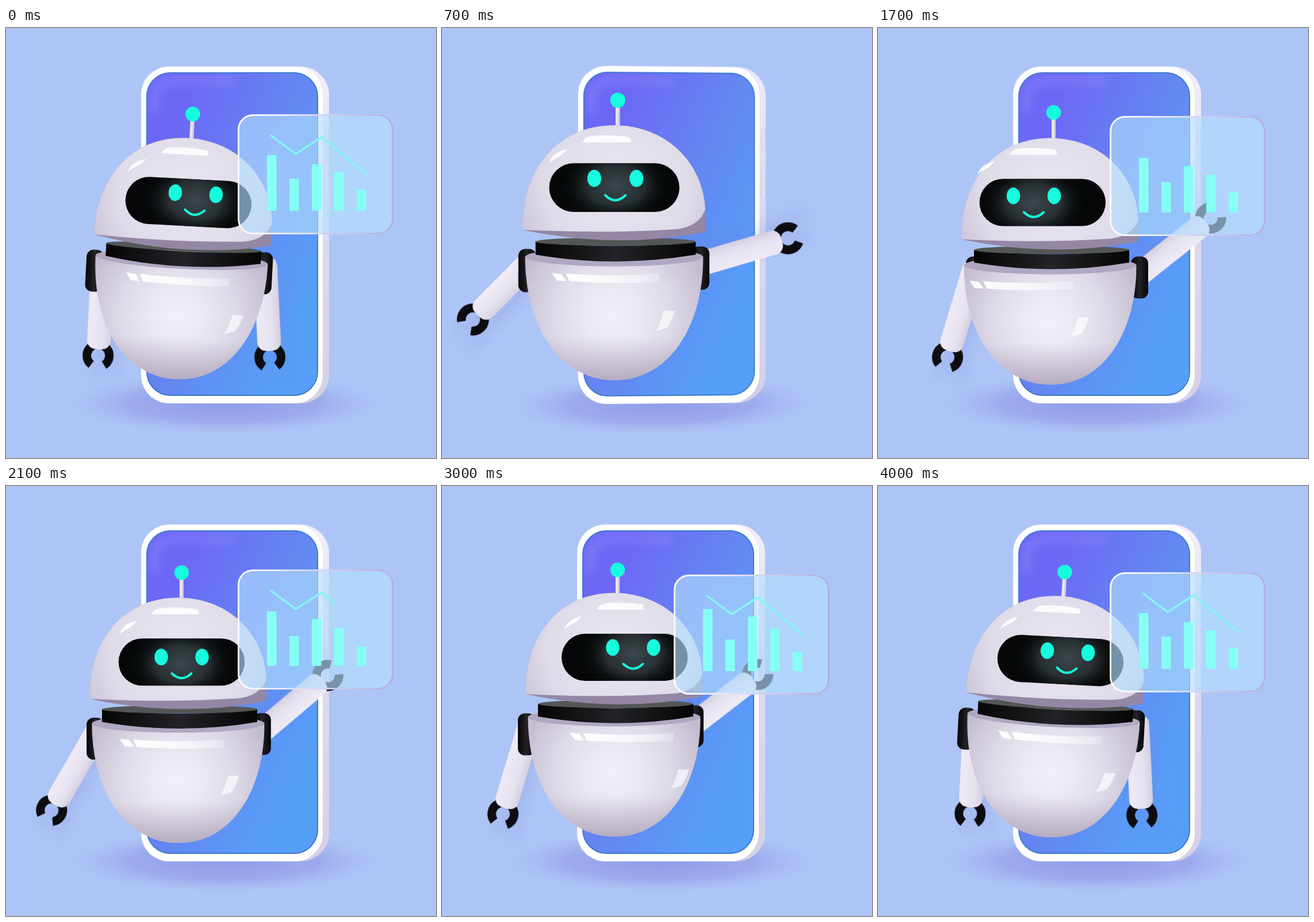
An HTML page for the animation above (4100 ms loop, 748 px wide and 748 px high).

```html
<!DOCTYPE html>
<html lang="en">
<head>
<meta charset="utf-8">
<title>Robot assistant</title>
<style>
  html, body { margin: 0; width: 100%; height: 100%; overflow: hidden; background: #adc5f6; }
  #stage { position: relative; width: 748px; height: 748px; overflow: hidden; }
  #stage > svg { position: absolute; left: 0; top: 0; width: 748px; height: 748px; overflow: visible; }
  #phone { transform-origin: 398px 360px; }
  .arm { filter: drop-shadow(14px 22px 12px rgba(118, 126, 215, .2)); }
</style>
</head>
<body>
<div id="stage">
  <svg viewBox="0 0 748 748">
    <defs>
      <radialGradient id="floorFill">
        <stop offset="0" stop-color="#8f97e8" stop-opacity=".95"/>
        <stop offset=".6" stop-color="#949fe9" stop-opacity=".7"/>
        <stop offset="1" stop-color="#a3b4f1" stop-opacity="0"/>
      </radialGradient>
    </defs>
    <ellipse id="floor" cx="380" cy="653" rx="272" ry="54" fill="url(#floorFill)"/>
  </svg>

  <svg id="phone" viewBox="0 0 748 748">
    <defs>
      <linearGradient id="screenFill" gradientUnits="userSpaceOnUse" x1="244" y1="290" x2="542" y2="420">
        <stop offset="0" stop-color="#6c68f5"/>
        <stop offset=".5" stop-color="#6486f1"/>
        <stop offset="1" stop-color="#569ff9"/>
      </linearGradient>
      <linearGradient id="sideFill" x2="0" y2="1">
        <stop offset="0" stop-color="#f1eff8"/>
        <stop offset=".4" stop-color="#dedcf0"/>
        <stop offset="1" stop-color="#d6d0e4"/>
      </linearGradient>
      <filter id="soft" x="-30%" y="-30%" width="160%" height="160%"><feGaussianBlur stdDeviation="8"/></filter>
    </defs>
    <g id="side">
      <rect x="248" y="67" width="314" height="586" rx="50" fill="url(#sideFill)"/>
      <g fill="#e9e5f3" stroke="#cbc7e2">
        <rect x="555" y="173" width="6" height="37" rx="3"/>
        <rect x="555" y="247" width="6" height="47" rx="3"/>
      </g>
    </g>
    <rect x="235" y="67" width="316" height="586" rx="49" fill="#fff"/>
    <rect x="245" y="78" width="297" height="561" rx="41" fill="url(#screenFill)" stroke="#3c78cc" stroke-width="2"/>
    <path d="M258 150V124Q260 94 294 92H400" fill="none" stroke="#a7a0fb" stroke-width="10" opacity=".4" filter="url(#soft)"/>
  </svg>

  <svg viewBox="0 0 748 748">
    <defs>
      <radialGradient id="headFill" gradientUnits="userSpaceOnUse" cx="305" cy="285" r="175">
        <stop offset="0" stop-color="#e9e6f1"/>
        <stop offset=".7" stop-color="#dfdce9"/>
        <stop offset="1" stop-color="#cdc7da"/>
      </radialGradient>
      <radialGradient id="bodyFill" gradientUnits="userSpaceOnUse" cx="297" cy="500" r="165">
        <stop offset="0" stop-color="#f1eff7"/>
        <stop offset=".3" stop-color="#eae7f1"/>
        <stop offset=".6" stop-color="#dedae7"/>
        <stop offset="1" stop-color="#c4bdd0"/>
      </radialGradient>
      <linearGradient id="bodyShade" x2="0" y2="1">
        <stop offset=".65" stop-color="#a99db5" stop-opacity="0"/>
        <stop offset="1" stop-color="#a395ae" stop-opacity=".65"/>
      </linearGradient>
      <linearGradient id="armFill">
        <stop offset="0" stop-color="#eeebf6"/>
        <stop offset=".6" stop-color="#e6e3f0"/>
        <stop offset="1" stop-color="#d5d0e1"/>
      </linearGradient>
      <linearGradient id="blackFill">
        <stop offset="0" stop-color="#050506"/>
        <stop offset=".5" stop-color="#232327"/>
        <stop offset="1" stop-color="#050506"/>
      </linearGradient>
      <linearGradient id="shine">
        <stop offset="0" stop-color="#fff" stop-opacity=".95"/>
        <stop offset=".45" stop-color="#fff" stop-opacity=".75"/>
        <stop offset="1" stop-color="#fff" stop-opacity=".25"/>
      </linearGradient>
      <radialGradient id="glow">
        <stop offset="0" stop-color="#3d484c"/>
        <stop offset=".5" stop-color="#272f32"/>
        <stop offset="1" stop-color="#050708" stop-opacity="0"/>
      </radialGradient>
      <linearGradient id="rim">
        <stop offset="0" stop-color="#fff"/>
        <stop offset=".45" stop-color="#d9dcf7"/>
        <stop offset="1" stop-color="#b3aee0"/>
      </linearGradient>
      <clipPath id="visorClip"><rect x="208" y="257" width="219.500" height="82" rx="41"/></clipPath>
      <path id="claw" d="M-11.200 16A19.500 19.500 0 1 1 11.200 16" fill="none" stroke="#0d0d10" stroke-width="15"/>
      <path id="bowl" d="M149.500 403C149.500 522 210 610 300 610S449.500 522 449.500 403Z"/>
    </defs>

    <g id="robot">
      <g class="arm" id="armL"><use href="#claw"/><rect x="-20.500" width="41" rx="15" fill="url(#armFill)"/></g>
      <g class="arm" id="armR"><use href="#claw"/><rect x="-20.500" width="41" rx="15" fill="url(#armFill)"/></g>
      <rect id="jointL" x="-15" y="-36.500" width="30" height="73" rx="12" fill="url(#blackFill)"/>
      <rect id="jointR" x="-15" y="-36.500" width="30" height="73" rx="12" fill="url(#blackFill)"/>

      <g id="body">
        <use href="#bowl" fill="url(#bodyFill)"/>
        <use href="#bowl" fill="url(#bodyShade)"/>
        <ellipse cx="299.500" cy="402" rx="150" ry="16" fill="#b0a7c1"/>
        <g id="bodyShine">
          <path d="M222 429L239 431 247 443 231 442Z" fill="#fff" opacity=".9"/>
          <path d="M246 430Q320 436 404 430L402 444Q325 448 252 443Z" fill="url(#shine)"/>
          <path d="M411 493H430Q426 508 416 522L398 527Q407 511 411 493Z" fill="#fff" opacity=".65"/>
        </g>
      </g>

      <g id="ring">
        <path d="M167 379Q302 394 437 379V401Q302 424 167 401Z" fill="url(#blackFill)"/>
        <ellipse cx="302" cy="379" rx="135" ry="7" fill="#535755"/>
      </g>

      <g id="antenna">
        <rect x="302" y="156" width="7" height="40" fill="#e9e6f2"/>
        <rect x="306.500" y="156" width="2.500" height="40" fill="#cfcadd"/>
        <circle cx="305.500" cy="146" r="12.700" fill="#16fbdd"/>
      </g>

      <g id="head">
        <path d="M145 362C143 260 205 186 299 186S456 262 453 362Q453 366 447 367Q300 395 145 362Z" fill="#9487a6"/>
        <path d="M145 362C143 260 205 186 299 186C390 186 450 252 453 328Q442 357 404 361Q285 369 145 362Z" fill="url(#headFill)"/>
        <g id="headShine" fill="#fff">
          <path d="M269 215Q273 206 284 204Q318 201 349 206L352 215Z" opacity=".85"/>
          <path d="M213 250Q218 232 243 226Q236 236 226 241Q218 244 213 250Z" opacity=".9"/>
        </g>
        <g id="visor" clip-path="url(#visorClip)">
          <rect x="207" y="256" width="222" height="84" fill="#050708"/>
          <g id="face">
            <ellipse cy="12" rx="94" ry="66" fill="url(#glow)"/>
            <ellipse cx="-35.500" rx="11.700" ry="14.500" fill="#16fbdd"/>
            <ellipse cx="35.500" rx="11.700" ry="14.500" fill="#16fbdd"/>
            <path d="M-17 28.500Q0 45 17 28.500" fill="none" stroke="#16fbdd" stroke-width="4" stroke-linecap="round"/>
          </g>
        </g>
      </g>
    </g>

    <g id="card">
      <rect x="1.500" y="1.500" width="268" height="206" rx="25" fill="#b4deff" fill-opacity=".64" stroke="url(#rim)" stroke-width="2.800"/>
      <g id="bars" fill="#86fff4"></g>
      <path id="trend" d="M58 37L101 69 146 40 224 104" pathLength="100" fill="none" stroke="#83f7f2" stroke-width="3.500" stroke-linecap="round" stroke-linejoin="round" stroke-dasharray="100 200"/>
    </g>
  </svg>
</div>

<script>
const LOOP = 4100, STEP = 100;
const $ = id => document.getElementById(id);
const move = (id, value) => $(id).setAttribute('transform', value);

// Eased value of a track at time t, held before the first and after the last key.
function at(times, values, t) {
  if (t <= times[0]) return values[0];
  const i = times.findIndex(k => k >= t);
  if (i < 0) return values[values.length - 1];
  const x = (t - times[i - 1]) / (times[i] - times[i - 1]);
  return values[i - 1] + (values[i] - values[i - 1]) * (1 - Math.cos(Math.PI * x)) / 2;
}

// Main poses: arms out, pointing, looking left (held), looking right, nod, rest.
const POSES = [300, 1100, 1300, 1700, 2400, 3000, 3950];
const hold = ([a, b, c, ...rest]) => [a, b, c, c, ...rest];
const pose = (values, t) => at(POSES, hold(values), t);

const robot = {
  tilt:     [0, 0, 0, 0, 0, 3],
  headY:    [0, 2.5, 5.5, 10, 0, 5],
  antennaY: [2, -4, 1, 7, 0, 3],
  ringY:    [3.5, 5, 7, 11, 0, 2],
  bodyY:    [5, 9, 10.5, 11.5, 0, 1],
  turn:     [1, 1, 1.75, 0, 0, .65],
  bodyTurn: [.55, 1, 1.75, 0, 0, .5],
  visorY:   [-14, 0, 0, 0, 0, 0],
  eyeX:     [4, 0, -15, 10, 15, 12],
  eyeY:     [-27, -4, -11.5, -7, -17, -16],
};
const arms = {
  leftX:  [154, 152, 168, 147, 147, 149],
  leftY:  [431, 433, 434, 443, 432, 430],
  pivotX: [152, 152, 165, 150, 150, 163],
  rightX: [442, 448, 455, 440, 440, 443],
  rightY: [424, 432, 434, 430, 418, 419],
  leftLength:  [102, 154, 153, 153, 153, 155],
  rightLength: [138, 163, 154, 140, 134, 154],
  rightAngle:  [-90, -122.7, -128.4, -131.5, -127.7, -5.8],
};
const barHeights = [
  [0, 107, 95, 95, 108, 97],
  [0, 62, 53, 51, 55, 56],
  [0, 88, 81, 82, 95, 81],
  [0, 74, 66, 65, 74, 67],
  [0, 41, 35, 33, 34, 37],
];
const cardY = [150, 151, 153, 140, 154, 150];

const bars = barHeights.map((_, i) => {
  const bar = document.createElementNS('http://www.w3.org/2000/svg', 'rect');
  bar.setAttribute('x', 51 + 39 * i);
  bar.setAttribute('width', 16.5);
  $('bars').append(bar);
  return bar;
});

function drawArm(id, x, y, angle, length) {
  const a = angle * Math.PI / 180;
  move(id, `translate(${x - length * Math.sin(a)} ${y + length * Math.cos(a)}) rotate(${angle})`);
  const sleeve = $(id).querySelector('rect');
  sleeve.setAttribute('y', -length - 20);
  sleeve.setAttribute('height', length + 9);
}

function drawPhone(t) {
  const spin = at([100, 300, 800], [58, 37, 0], t);
  const turned = spin / 37;
  const blur = Math.min(1, turned);
  const style = $('phone').style;
  style.transform = spin ? `translateX(${23 * turned}px) perspective(2160px) rotateY(${spin}deg)` : 'none';
  style.filter = blur ? `blur(${2.5 * blur}px) drop-shadow(0 0 5px rgba(255,255,255,${.6 * blur}))` : 'none';
  $('side').style.opacity = 1 - blur;
  move('floor', `translate(${12 * blur} ${12 * blur}) rotate(${-10 * blur} 380 653) translate(380 0) scale(${1 - .24 * blur} 1) translate(-380 0)`);
}

function drawRobot(t) {
  const r = {};
  for (const k in robot) r[k] = pose(robot[k], t);
  for (const k in arms) r[k] = pose(arms[k], t);
  const scale = at([100, 200, 300, 400, 800], [.6, 1, 1.24, 1.22, 1], t);
  const rise = at([100, 300], [1, 0], t);
  const leftAngle = at([300, 700, 1100, 1200, 1800, 2100, 2400, 3000, 3950],
    [91, 45, 22.9, 17, 16.7, 30, 16.7, 16.7, 0], t);

  move('robot', `translate(${300 + 70 * rise} ${746 - 100 * rise}) scale(${scale}) translate(-300 -746) rotate(${r.tilt} 300 520)`);
  drawArm('armL', r.pivotX, r.leftY - 8, leftAngle, r.leftLength);
  drawArm('armR', r.rightX + 3, r.rightY - 8, r.rightAngle, r.rightLength);
  move('jointL', `translate(${r.leftX} ${r.leftY})`);
  move('jointR', `translate(${r.rightX} ${r.rightY})`);
  move('body', `translate(0 ${r.bodyY})`);
  move('bodyShine', `translate(${-36 * r.bodyTurn} 0)`);
  move('ring', `translate(0 ${r.ringY})`);
  move('antenna', `translate(0 ${r.antennaY})`);
  move('head', `translate(0 ${r.headY})`);
  move('headShine', `translate(${-23 * r.turn} 0)`);
  move('visor', `translate(${-18 * r.turn} ${r.visorY})`);
  move('face', `translate(${317.5 + r.eyeX} ${298 + r.eyeY})`);
}

function drawCard(t) {
  const scale = at([700, 1100, 1200], [0, .952, 1], t);
  $('card').style.display = scale ? '' : 'none';
  $('card').style.opacity = at([700, 1100, 1300], [0, .78, 1], t);
  move('card', `translate(403 ${pose(cardY, t)}) scale(${scale})`);
  bars.forEach((bar, i) => {
    const h = pose(barHeights[i], t);
    bar.setAttribute('y', 168 - h);
    bar.setAttribute('height', h);
  });
  const drawn = at([1800, 2300], [0, 100], t);
  $('trend').style.display = drawn ? '' : 'none';
  $('trend').setAttribute('stroke-dashoffset', 100 - drawn);
}

const start = performance.now();
function tick() {
  const step = Math.floor((performance.now() - start) % LOOP / STEP) * STEP;
  const t = step || LOOP - STEP; // the loop opens on its resting pose
  drawPhone(t);
  drawRobot(t);
  drawCard(t);
  requestAnimationFrame(tick);
}
tick();
</script>
</body>
</html>
```
